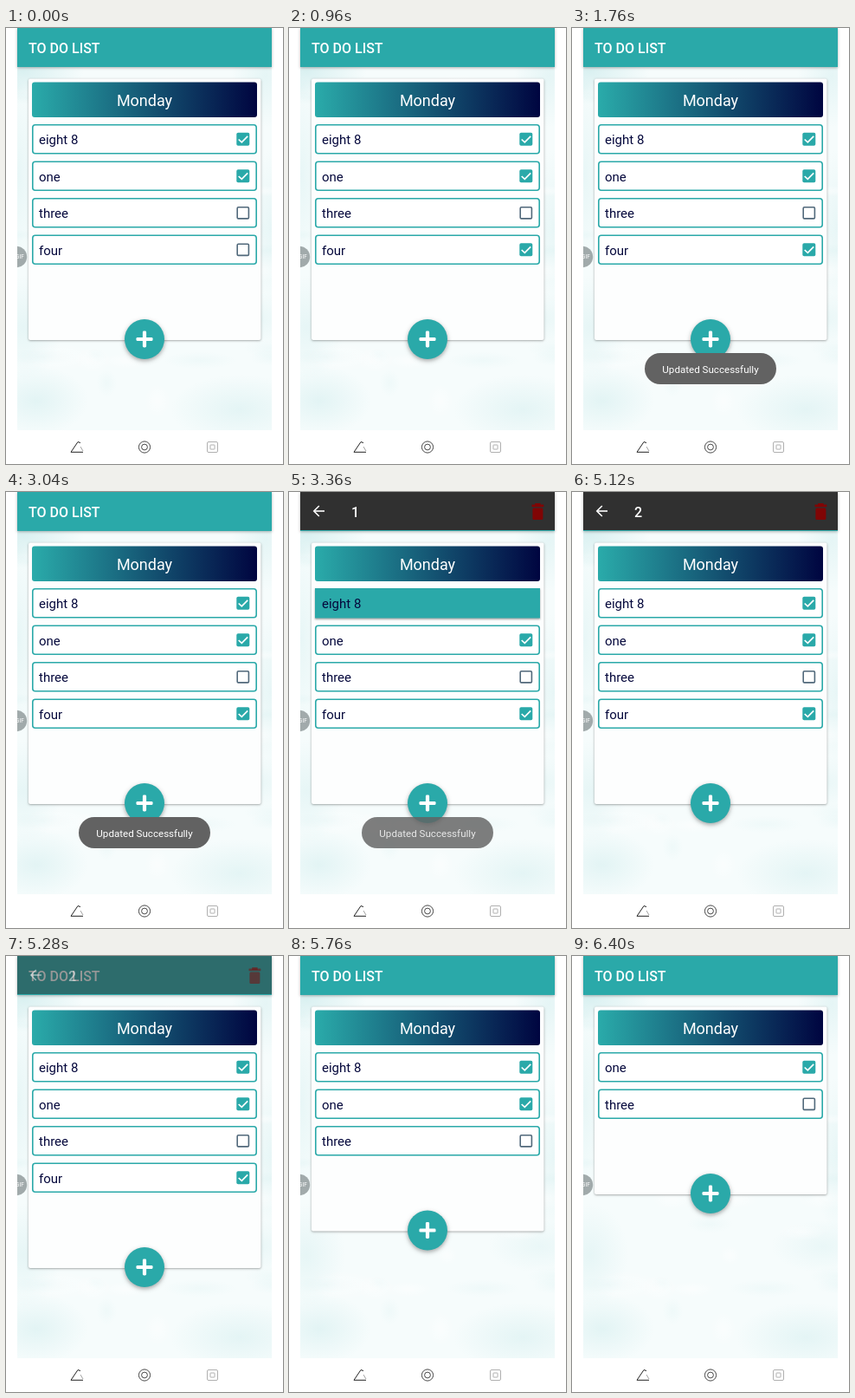
These frames come from a looping animation (320 px wide and 503 px high, 9.6 s). An HTML page with a canvas:

```html
<!DOCTYPE html>
<html lang="en">
<head>
<meta charset="utf-8">
<title>To do list</title>
<style>
html, body { margin: 0; width: 100%; height: 100%; overflow: hidden; background: #fff; }
canvas { display: block; width: 320px; height: 503px; }
</style>
</head>
<body>
<canvas id="stage"></canvas>
<script>
const W = 320, H = 503, LOOP = 9600, STEP = 160;
const TEAL = '#2aa9a9', NAVY = '#05083c', PITCH = 42.5;
const canvas = document.getElementById('stage');
const c = canvas.getContext('2d');
const dpr = window.devicePixelRatio || 1;
canvas.width = W * dpr;
canvas.height = H * dpr;

const ramp = (t, a, b) => Math.min(1, Math.max(0, (t - a) / (b - a)));
const smooth = x => x * x * (3 - 2 * x);

function box(x, y, w, h, r, fill) {
  c.beginPath();
  c.roundRect(x, y, w, h, r);
  if (fill) { c.fillStyle = fill; c.fill(); }
}

function disc(x, y, r, fill) {
  c.beginPath();
  c.arc(x, y, r, 0, Math.PI * 2);
  c.fillStyle = fill;
  c.fill();
}

function line(points, color, width) {
  c.beginPath();
  points.forEach(([x, y]) => c.lineTo(x, y));
  c.strokeStyle = color;
  c.lineWidth = width;
  c.stroke();
}

function text(s, x, y, size, color, weight = 400, align = 'left') {
  c.font = `${weight} ${size}px Roboto, sans-serif`;
  c.textAlign = align;
  c.fillStyle = color;
  c.fillText(s, x, y);
}

function shadowed(color, blur, dy, draw) {
  c.save();
  c.shadowColor = color;
  c.shadowBlur = blur * dpr;
  c.shadowOffsetY = dy * dpr;
  draw();
  c.restore();
}

function faded(alpha, draw) {
  if (alpha <= 0) return;
  c.save();
  c.globalAlpha *= alpha;
  draw();
  c.restore();
}

function blob(x, y, rx, ry, rgb, alpha) {
  c.save();
  c.translate(x, y);
  c.scale(rx, ry);
  const g = c.createRadialGradient(0, 0, 0, 0, 0, 1);
  g.addColorStop(0, `rgba(${rgb},${alpha})`);
  g.addColorStop(1, `rgba(${rgb},0)`);
  disc(0, 0, 1, g);
  c.restore();
}

// Pale watercolour wash behind the card
function wash() {
  c.save();
  c.beginPath();
  c.rect(13, 0, 294, 464);
  c.clip();
  c.fillStyle = '#f6fcfc';
  c.fillRect(13, 0, 294, 464);
  const tint = '190,229,230';
  blob(20, 50, 70, 34, tint, 0.5);
  blob(300, 55, 40, 60, tint, 0.3);
  blob(14, 170, 26, 110, tint, 0.25);
  blob(306, 230, 26, 90, tint, 0.25);
  blob(20, 345, 45, 60, tint, 0.28);
  blob(290, 335, 60, 30, tint, 0.22);
  blob(35, 430, 60, 40, tint, 0.35);
  blob(270, 440, 80, 40, tint, 0.32);
  let seed = 11;
  const rnd = () => (seed = seed * 16807 % 2147483647) / 2147483647;
  for (let i = 0; i < 36; i++) {
    const rgb = i % 2 ? '255,255,255' : tint;
    blob(13 + rnd() * 294, 60 + rnd() * 400, 12 + rnd() * 32, 6 + rnd() * 14, rgb, i % 2 ? 0.5 : 0.13);
  }
  c.restore();
}

function checkbox(y, checked) {
  if (!checked) {
    box(267.2, y - 6.5, 13.2, 13.2, 1.2);
    c.strokeStyle = '#51697b';
    c.lineWidth = 1.6;
    c.stroke();
    return;
  }
  box(266.3, y - 7.4, 15, 15, 1.8, TEAL);
  line([[268.7, y + 0.3], [272.3, y + 3.7], [279.2, y - 3.4]], '#fff', 1.7);
}

function row({ label, y, checked, selected, alpha = 1 }) {
  faded(alpha, () => {
    if (selected) {
      shadowed('rgba(0,0,0,.35)', 2, 1, () => box(30, y, 260, 34.5, 0, TEAL));
    } else {
      box(30.8, y + 0.8, 258.4, 33, 3, '#fff');
      c.strokeStyle = TEAL;
      c.lineWidth = 1.6;
      c.stroke();
      checkbox(y + 17.2, checked);
    }
    text(label, 38, y + 23, 15, NAVY);
  });
}

function card(bottom) {
  shadowed('rgba(0,0,0,.38)', 2.5, 0.8, () => box(26, 58.5, 268.5, bottom - 58.5, 2, '#fdfefe'));
  const g = c.createLinearGradient(30, 0, 290, 0);
  g.addColorStop(0, '#2aabaa');
  g.addColorStop(1, '#000540');
  box(30, 62.5, 260, 40.5, 3, g);
  text('Monday', 160, 90, 18, '#fff', 400, 'center');
}

function addButton(y) {
  shadowed('rgba(0,0,0,.35)', 5, 2, () => disc(160, y, 23, TEAL));
  box(150.5, y - 2.1, 19, 4.2, 1.4, '#fff');
  box(157.9, y - 9.5, 4.2, 19, 1.4, '#fff');
}

function bin() {
  const red = '#800505';
  box(284.2, 13, 6.4, 3, 0.5, red);
  box(280.5, 14.5, 13.8, 2.7, 0.4, red);
  box(281.4, 18.4, 12, 13.6, 1.6, red);
}

function header(dark, count) {
  shadowed('rgba(0,0,0,.3)', 3, 1, () => box(13, 0, 294, 45, 0, TEAL));
  text('TO DO LIST', 26, 29, 16, '#fff', 500);
  faded(dark, () => {
    box(13, 0, 294, 44, 0, '#303030');
    line([[41, 22], [29, 22]], '#fff', 1.6);
    line([[34.8, 16], [28.8, 22], [34.8, 28]], '#fff', 1.6);
    text(count, 72, 29, 16, '#fff', 500);
    bin();
  });
}

function bubble() {
  c.save();
  c.beginPath();
  c.rect(13, 250, 14, 28);
  c.clip();
  disc(12, 264, 12.2, '#a1aaab');
  text('GIF', 16, 266.3, 6.5, '#fff', 400, 'center');
  c.restore();
}

function navigation() {
  c.fillStyle = '#fff';
  c.fillRect(0, 464, W, 39);
  line([[89, 489.3], [75, 489.3], [83, 477.5], [86, 478.5]], '#222', 1);
  line([[86, 483], [89, 488]], '#888', 0.8);
  for (const r of [6.6, 3.4]) {
    c.beginPath();
    c.arc(160, 483.5, r, 0, Math.PI * 2);
    c.strokeStyle = '#333';
    c.lineWidth = 0.9;
    c.stroke();
  }
  c.strokeStyle = '#a8a8a8';
  box(232.5, 477.5, 12, 12, 1.5);
  c.stroke();
  box(236, 481, 5, 5, 0.5);
  c.stroke();
}

function toast(alpha) {
  faded(alpha, () => {
    box(84, 375, 152, 36, 18, '#626262');
    text('Updated Successfully', 160, 398, 11.6, '#fff', 400, 'center');
  });
}

function render(t) {
  const removedTwo = t >= 6400;
  const bottom = 360 - PITCH * ((t >= 5760) + removedTwo);
  const lift = PITCH * smooth(ramp(t, 5960, 6320));
  const slot = i => 111 + PITCH * i;
  const dark = Math.min(ramp(t, 3120, 3280), 1 - ramp(t, 5200, 5360));
  const picking = t < 5120;

  c.setTransform(dpr, 0, 0, dpr, 0, 0);
  c.fillStyle = '#fff';
  c.fillRect(0, 0, W, H);
  wash();
  card(bottom);
  row({ label: 'eight 8', y: slot(0), checked: true, selected: picking && t >= 3200, alpha: 1 - ramp(t, 5840, 6000) });
  row({ label: 'one', y: slot(1) - lift, checked: true });
  row({ label: 'three', y: slot(2) - lift, checked: false });
  row({ label: 'four', y: slot(3), checked: t >= 480, selected: picking && t >= 4160, alpha: 1 - ramp(t, 5280, 5440) });
  addButton(bottom - 1);
  header(dark, t >= 4160 ? '2' : '1');
  bubble();
  navigation();
  toast(Math.min(ramp(t, 1160, 1660), 1 - ramp(t, 3290, 3680)));
}

function tick(now) {
  const t = now % LOOP;
  render(Math.floor(t / STEP) * STEP);
  requestAnimationFrame(tick);
}
requestAnimationFrame(tick);
</script>
</body>
</html>
```
